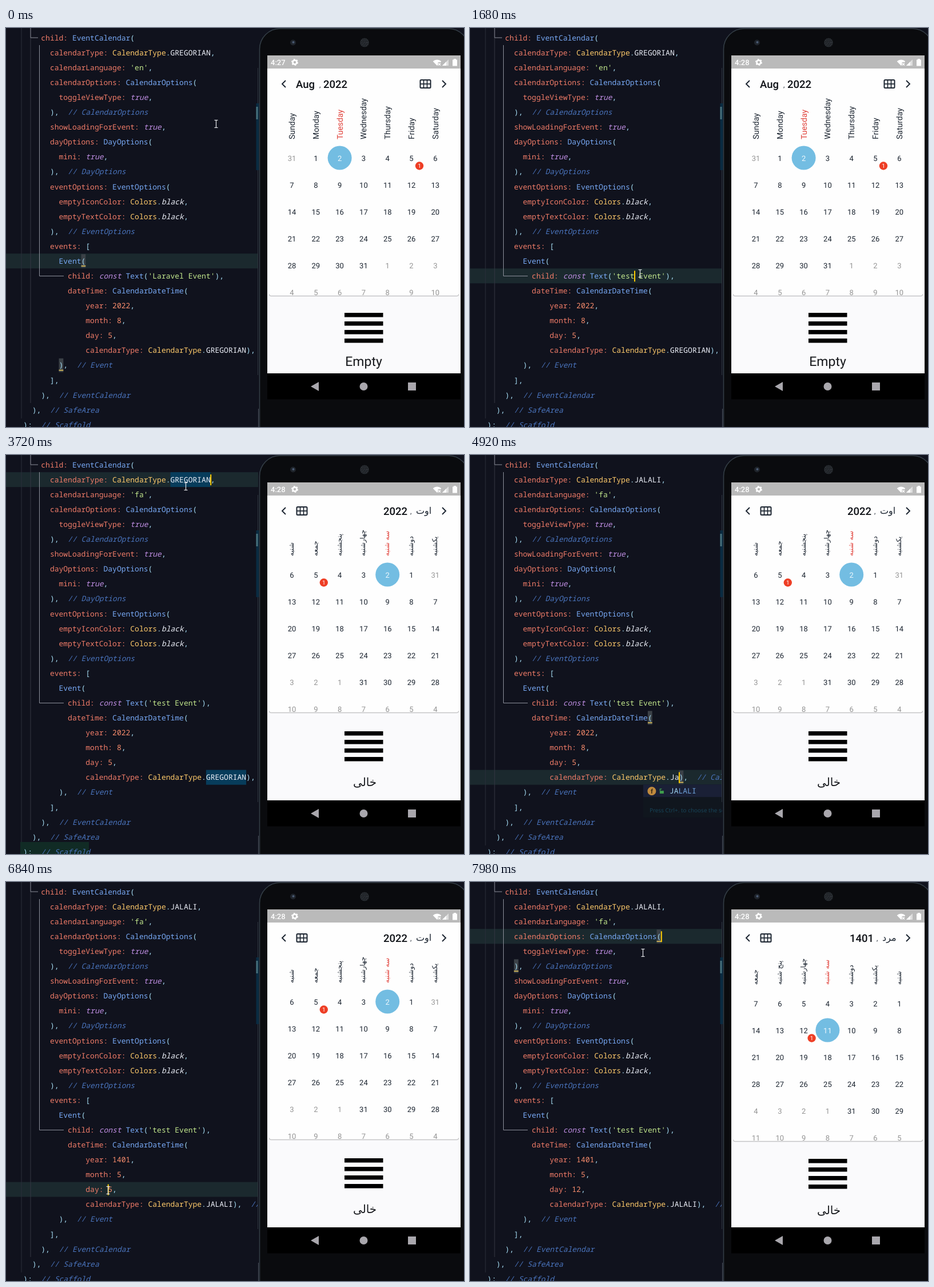
These frames come from a looping animation (801 by 699 pixels, 8 s). An HTML page with a canvas:

```html
<!DOCTYPE html>
<html lang="en">
<head>
<meta charset="utf-8">
<title>Event calendar demo</title>
<style>
html, body { margin: 0; height: 100%; overflow: hidden; background: #10121d; }
canvas { display: block; width: 801px; height: 699px; }
</style>
</head>
<body>
<canvas id="stage"></canvas>
<script>
const LOOP = 8000, STEP = 60;
const X0 = 30.1, CH = 7.8, LH = 26.08;          // code grid
const MONO = '"Noto Sans Mono", "DejaVu Sans Mono", monospace';
const SANS = 'Roboto, sans-serif';
const ARABIC = '"DejaVu Sans", sans-serif';
const canvas = document.getElementById('stage');
const dpr = window.devicePixelRatio || 1;
canvas.width = 801 * dpr;
canvas.height = 699 * dpr;
const c = canvas.getContext('2d');

// ---------- timeline: each entry patches the state ----------
const start = {
  clock: '4:27', view: 'en', type: 'GREGORIAN', lang: 'en', text: 'Laravel',
  year: '2022', month: '8', day: '5', type2: 'GREGORIAN',
  line: 15, caret: null, sel: [], pair: [[15, 13], [22, 8]], popup: null, toast: false
};
const hint1 = 'Ctrl+Down and Ctrl+Up will move caret down and up';
const hint2 = 'Press Ctrl+. to choose the selected suggestion';
const events = [
  [720, { line: 16, caret: 36, sel: [[16, 29, 36]], pair: [] }],
  [900, { clock: '4:28' }],
  ...typing('text', 'test', 16, 29, 1200, 90),
  [2280, { view: 'en5', line: -1, caret: null }],
  [2580, { line: 2, caret: 27, sel: [[2, 25, 27]] }],
  ...typing('lang', 'fa', 2, 25, 2760, 60),
  [2820, { popup: [2, 25, 'fake', 2, hint1] }],
  [3000, { popup: null }],
  [3240, { view: 'fa' }],
  [3600, { toast: true }],
  [3660, { line: 1, caret: 42, sel: [[1, 33, 42], [21, 41, 50]] }],
  [3780, { toast: false }],
  ...typing('type', 'Ja', 1, 33, 3900, 120),
  [4020, { popup: [1, 33, 'JALALI', 2, hint2, true] }],
  [4200, { type: 'JALALI', caret: 39, popup: null }],
  [4440, { line: 21, caret: 50, sel: [[21, 41, 50]] }],
  ...typing('type2', 'Ja', 21, 41, 4740, 120),
  [4860, { popup: [21, 41, 'JALALI', 2, hint2, true], pair: [[17, 36], [21, 43]] }],
  [5100, { type2: 'JALALI', caret: 47, popup: null, pair: [] }],
  [5400, { line: 18, caret: 24, sel: [[18, 20, 24]] }],
  ...typing('year', '1401', 18, 20, 5640, 60),
  [6120, { line: 19, caret: 22, sel: [[19, 21, 22]] }],
  ...typing('month', '5', 19, 21, 6300, 60),
  [6720, { line: 20, caret: 19 }],
  ...typing('day', '12', 20, 19, 7140, 120),
  [7560, { view: 'ja' }],
  [7860, { line: 3, caret: 39, pair: [[3, 38], [5, 6]] }]
];
// pointer moves: t0, t1, x0, y0, x1, y1
const moves = [
  [0, 300, 367, 168, 367, 168], [300, 720, 367, 168, 284, 434],
  [720, 1200, 284, 434, 284, 434], [1560, 1680, 284, 434, 297, 430],
  [1680, 1980, 297, 430, 440, 330], [2400, 2700, 440, 130, 233, 70],
  [3300, 3660, 440, 110, 314, 55], [3660, 3840, 314, 55, 314, 55],
  [4200, 4500, 314, 55, 385, 566], [5160, 5460, 385, 566, 204, 488],
  [5880, 6180, 204, 488, 200, 514], [6480, 6720, 200, 514, 178, 540],
  [6720, 7080, 178, 540, 178, 540], [7440, 7800, 178, 540, 302, 124],
  [7800, 8000, 302, 124, 302, 124]
];

function typing(key, word, line, col, t, gap) {
  return [...word].map((_, i) =>
    [t + i * gap, { [key]: word.slice(0, i + 1), line, caret: col + i + 1, sel: [] }]);
}

// ---------- drawing helpers ----------
function box(x, y, w, h, fill) { c.fillStyle = fill; c.fillRect(x, y, w, h); }
function disc(x, y, r, fill) {
  c.fillStyle = fill;
  c.beginPath(); c.arc(x, y, r, 0, 7); c.fill();
}
function poly(pts, color, width) {
  c.beginPath();
  pts.forEach(p => c.lineTo(...p));
  if (width) { c.strokeStyle = color; c.lineWidth = width; c.stroke(); }
  else { c.fillStyle = color; c.fill(); }
}
function txt(s, x, y, font, fill, align = 'left') {
  c.font = font; c.fillStyle = fill; c.textAlign = align;
  c.fillText(s, x, y);
}
const colX = n => X0 + n * CH;
const rowY = n => 17 + n * LH;

// ---------- code editor ----------
const source = s => [
  [4, 'child: EventCalendar('],
  [6, `calendarType: CalendarType.${s.type},`],
  [6, `calendarLanguage: '${s.lang}',`],
  [6, 'calendarOptions: CalendarOptions('],
  [8, 'toggleViewType: true,'],
  [6, '),  // CalendarOptions'],
  [6, 'showLoadingForEvent: true,'],
  [6, 'dayOptions: DayOptions('],
  [8, 'mini: true,'],
  [6, '),  // DayOptions'],
  [6, 'eventOptions: EventOptions('],
  [8, 'emptyIconColor: Colors.black,'],
  [8, 'emptyTextColor: Colors.black,'],
  [6, '),  // EventOptions'],
  [6, 'events: ['],
  [8, 'Event('],
  [10, `child: const Text('${s.text} Event'),`],
  [10, 'dateTime: CalendarDateTime('],
  [14, `year: ${s.year},`],
  [14, `month: ${s.month},`],
  [14, `day: ${s.day},`],
  [14, `calendarType: CalendarType.${s.type2}),  // CalendarDateTime`],
  [8, '),  // Event'],
  [6, '],'],
  [4, '),  // EventCalendar'],
  [2, '),  // SafeArea'],
  [0, ');  // Scaffold']
];
const rules = [
  [/^\/\/.*/, '#4a74bd', true],
  [/^'[^']*'/, '#c3e88d'],
  [/^(true|const)\b/, '#c08fe4', true],
  [/^\w+:/, '#f07c68'],
  [/^(CalendarType|Colors)(?=\.)/, '#ffcb6b'],
  [/^black/, '#eceff8', true],
  [/^\w+(?=\()/, '#78a9f5'],
  [/^\d+/, '#f78c6c'],
  [/^[A-Za-z]+/, '#eceff8'],
  [/^[^\w]/, '#a5dcf3']
];

function mono(s, x, y, fill, italic) {
  [...s].forEach((ch, i) =>
    txt(ch, x + i * CH, y, (italic ? 'italic ' : '') + '13px ' + MONO, fill));
}
function codeLine(indent, s, y) {
  for (let i = 0; i < s.length;) {
    const rest = s.slice(i);
    const [re, fill, italic] = rules.find(r => r[0].test(rest));
    const part = rest.match(re)[0];
    mono(part, colX(indent + i), y, fill, italic);
    i += part.length;
  }
}

function popup([line, col, word, hit, hint, icon]) {
  const x = colX(col) - (icon ? 47 : 7), y = rowY(line) + 12.5;
  box(x, y, 300, 58, '#10161e');
  box(x, y, 300, 22, '#1a2036');
  if (icon) {
    disc(x + 15, y + 11.5, 7.5, '#c08a3e');
    txt('f', x + 15, y + 15.5, 'bold 11px ' + SANS, '#3a2c18', 'center');
    box(x + 29, y + 11, 7, 5, '#3f9d4c');
    poly([[x + 29.5, y + 11], [x + 29.5, y + 8], [x + 32.5, y + 8]], '#3f9d4c', 1.3);
  }
  mono(word.slice(0, hit), colX(col) - 1, y + 15.5, '#9fd4f2');
  mono(word.slice(hit), colX(col + hit) - 1, y + 15.5, '#6fa3dc');
  txt(hint, x + 11, y + 49, '10px "Open Sans", sans-serif', '#18465b');
}

function editor(s) {
  c.save();
  c.beginPath(); c.rect(0, 0, 441, 699); c.clip();
  if (s.line >= 0) box(0, rowY(s.line) - 13, 441, 26, '#1b292e');
  box(26.5, 0, 1, 684, '#2b2e3a');
  box(42.5, 17, 1, 640, '#343743');
  poly([[43, 0], [43, 17], [56, 17]], '#8d909b', 1);
  poly([[58.5, 30], [58.5, 434.5], [101, 434.5]], '#8d909b', 1);
  if (s.toast) box(25, 678, 120, 21, '#112b25');
  s.sel.forEach(([l, a, b]) => box(colX(a), rowY(l) - 13, (b - a) * CH, 26, '#073c5b'));
  s.pair.forEach(([l, n]) => box(colX(n), rowY(l) - 12, CH, 24, '#3b4147'));
  source(s).forEach(([indent, str], i) => codeLine(indent, str, rowY(i) + 4.7));
  s.pair.forEach(([l, n]) => box(colX(n), rowY(l) + 8, CH, 1.6, '#e6c65a'));
  if (s.caret !== null) box(colX(s.caret) - .5, rowY(s.line) - 9, 2, 19, '#ffcc00');
  if (s.popup) popup(s.popup);
  c.restore();
  box(437.5, 132, 5, 117, '#0a2c42');
  box(437.5, 138, 3, 22, '#47717c');
  box(440, 70, 1, 62, '#2f363e');
  box(440, 249, 1, 359, '#2f363e');
  box(441, 667, 1, 32, '#4a525c');
}

function pointer(t) {
  const m = moves.find(m => t >= m[0] && t < m[1]);
  if (!m) return;
  let k = (t - m[0]) / (m[1] - m[0]);
  k = k * k * (3 - 2 * k);
  const x = Math.round(m[2] + (m[4] - m[2]) * k) + .5, y = m[3] + (m[5] - m[3]) * k;
  poly([[x, y - 6], [x, y + 6]], '#e4e6ea', 1.2);
  for (const d of [-6.5, 6.5]) poly([[x - 3, y + d], [x + 3, y + d]], '#e4e6ea', 1.2);
}

// ---------- phone ----------
const INK = '#1b2430', RED = '#e0413a';
const enDays = ['Sunday', 'Monday', 'Tuesday', 'Wednesday', 'Thursday', 'Friday', 'Saturday'];
const faDays = ['یکشنبه', 'دوشنبه', 'سه شنبه', 'چهارشنبه', 'پنجشنبه', 'جمعه', 'شنبه'];
const jaDays = ['شنبه', 'یکشنبه', 'دوشنبه', 'سه شنبه', 'چهارشنبه', 'پنج شنبه', 'جمعه'];
const en = { days: enDays, lead: 1, top: 227.5, names: 195, bars: 499, empty: 592, pick: 2, badge: 5 };
const fa = { days: faDays, lead: 1, top: 209.5, names: 177, bars: 484, empty: 580, pick: 2, badge: 5,
  rtl: true, month: 'اوت', monthX: 717, year: '2022', yearX: 660 };
const views = {
  en, fa,
  en5: { ...en, pick: 5, event: true },
  ja: { ...fa, days: jaDays, lead: 0, top: 212.5, names: 180, bars: 485, empty: 582,
    pick: 11, badge: 12, month: 'مرد', monthX: 721, year: '1401', yearX: 664 }
};

function gridIcon(x, y) {
  c.strokeStyle = INK; c.lineWidth = 2;
  c.beginPath(); c.roundRect(x - 9, y - 7, 18, 14, 1.5); c.stroke();
  poly([[x - 9, y], [x + 9, y]], INK, 1.7);
  for (const d of [-3, 3]) poly([[x + d, y - 7], [x + d, y + 7]], INK, 1.7);
}
function historyIcon(x, y) {
  c.strokeStyle = INK; c.lineWidth = 1.9;
  c.beginPath(); c.arc(x + 1, y, 8, -Math.PI, Math.PI * .74); c.stroke();
  poly([[x - 10.5, y - .5], [x - 3.5, y - .5], [x - 7, y + 3.5]], INK);
  poly([[x + .5, y - 4.5], [x + .5, y + .8], [x + 4.5, y + 3]], INK, 1.6);
}

function statusBar(clock) {
  box(457, 48, 338, 23, '#bababa');
  txt(clock, 463, 64.5, '500 13px ' + SANS, '#fff');
  c.strokeStyle = '#fff'; c.lineWidth = 2.6;
  c.beginPath(); c.arc(505, 60, 3.5, 0, 7); c.stroke();
  c.lineWidth = 2; c.setLineDash([2.6, 2.6]);
  c.beginPath(); c.arc(505, 60, 5, 0, 6.283); c.stroke();
  c.setLineDash([]);
  c.fillStyle = '#fff';
  c.beginPath(); c.moveTo(754, 66); c.arc(754, 66, 10.5, -2.35, -.8); c.fill();
  box(755.5, 60, 6, 7, '#bababa');
  poly([[756, 61.5], [760, 65.5]], '#fff', 1.2);
  poly([[760, 61.5], [756, 65.5]], '#fff', 1.2);
  poly([[763, 66], [774, 66], [774, 55]], '#dedede');
  poly([[763, 66], [770, 66], [770, 59]], '#fff');
  box(781, 55.5, 8, 11, '#fff');
  box(783, 54, 4, 2, '#fff');
}

function header(v) {
  const bold = '500 18.5px ' + SANS, dark = '#0e1116';
  poly([[489, 92], [483, 98], [489, 104]], INK, 1.9);
  poly([[763, 92], [769, 98], [763, 104]], INK, 1.9);
  if (v.rtl) {
    gridIcon(517.5, 98);
    txt(v.month, v.monthX, 102.5, '16px ' + ARABIC, INK);
    txt(',', v.yearX + 47, 103, '12px ' + SANS, INK);
    txt(v.year, v.yearX, 105, bold, dark);
  } else {
    gridIcon(733.5, 98);
    if (v.event) historyIcon(702, 98);
    txt('Aug', 507, 105, bold, dark);
    txt(',', 548, 104, '12px ' + SANS, INK);
    txt('2022', 555, 105, bold, dark);
  }
}

function calendar(v) {
  const cx = i => 500 + 41.8 * (v.rtl ? 6 - i % 7 : i % 7);
  const picked = (v.pick + v.lead - 1) % 7;
  v.days.forEach((name, i) => {
    c.save();
    c.translate(cx(i) + (v.rtl ? 3 : 5), v.names);
    c.rotate(-Math.PI / 2);
    txt(name, 0, 0, v.rtl ? '12px ' + ARABIC : '14px ' + SANS, i === picked ? RED : INK);
    c.restore();
  });
  for (let i = 0; i < 42; i++) {
    const n = i - v.lead + 1, x = cx(i), y = v.top + 47 * Math.floor(i / 7);
    const outside = n < 1 || n > 31;
    if (n === v.pick) disc(x, y, 21, '#73bde2');
    txt((n + 30) % 31 + 1, x, y + 5, '13px ' + SANS,
      n === v.pick ? '#eef8fd' : outside ? '#949494' : INK, 'center');
    if (n === v.badge) {
      disc(x + 14, y + 14, 7.2, '#ee3e25');
      txt('1', x + 14, y + 17.7, '10px ' + SANS, '#fff', 'center');
    }
  }
}

function eventList(v) {
  if (v.event) {
    txt('test Event', 461, 490.5, '13px ' + SANS, INK);
    return;
  }
  for (let i = 0; i < 4; i++) box(592, v.bars + i * 15, 67.5, 7.5, '#000');
  if (v.rtl) txt('خالی', 607, v.empty, '20px ' + ARABIC, '#16181c');
  else txt('Empty', 625.5, v.empty, '23px ' + SANS, '#16181c', 'center');
}

function phone(s) {
  const v = views[s.view], edge = v.top + 242;
  c.beginPath(); c.roundRect(443.5, 1, 366, 760, 36);
  c.fillStyle = '#0a0b0e'; c.fill();
  c.strokeStyle = '#333d45'; c.lineWidth = 1.6; c.stroke();
  disc(502, 25.5, 5, '#1f242b');
  disc(502.5, 25, 2, '#4a5a72');
  disc(627, 25.5, 8, '#1d2024');
  c.strokeStyle = '#41464d'; c.lineWidth = 1.2; c.setLineDash([1.3, 1.6]);
  for (const r of [1.5, 4, 6.5]) { c.beginPath(); c.arc(627, 25.5, r, 0, 6.283); c.stroke(); }
  c.setLineDash([]);

  box(457, 71, 338, 534, '#fafafc');
  box(457, 71, 338, edge - 71, '#fefefe');
  statusBar(s.clock);
  header(v);
  calendar(v);
  c.strokeStyle = '#c4c4c6'; c.lineWidth = 1.3;
  c.beginPath();
  c.moveTo(460.5, edge - 3);
  c.quadraticCurveTo(460.5, edge, 464, edge);
  c.lineTo(788, edge);
  c.quadraticCurveTo(791.5, edge, 791.5, edge - 3);
  c.stroke();
  eventList(v);

  box(457, 605, 338, 45.5, '#000');
  poly([[533, 628], [547, 620], [547, 636]], '#a9a7ad');
  disc(625.5, 628, 7, '#a9a7ad');
  box(703, 621, 14, 14, '#a9a7ad');
}

function frame(now) {
  const t = Math.floor(now % LOOP / STEP) * STEP;
  const s = Object.assign({}, start, ...events.filter(e => e[0] <= t).map(e => e[1]));
  c.setTransform(dpr, 0, 0, dpr, 0, 0);
  c.textRendering = 'geometricPrecision';
  box(0, 0, 801, 699, '#10121d');
  editor(s);
  phone(s);
  pointer(t);
  requestAnimationFrame(frame);
}
requestAnimationFrame(frame);
</script>
</body>
</html>
```
